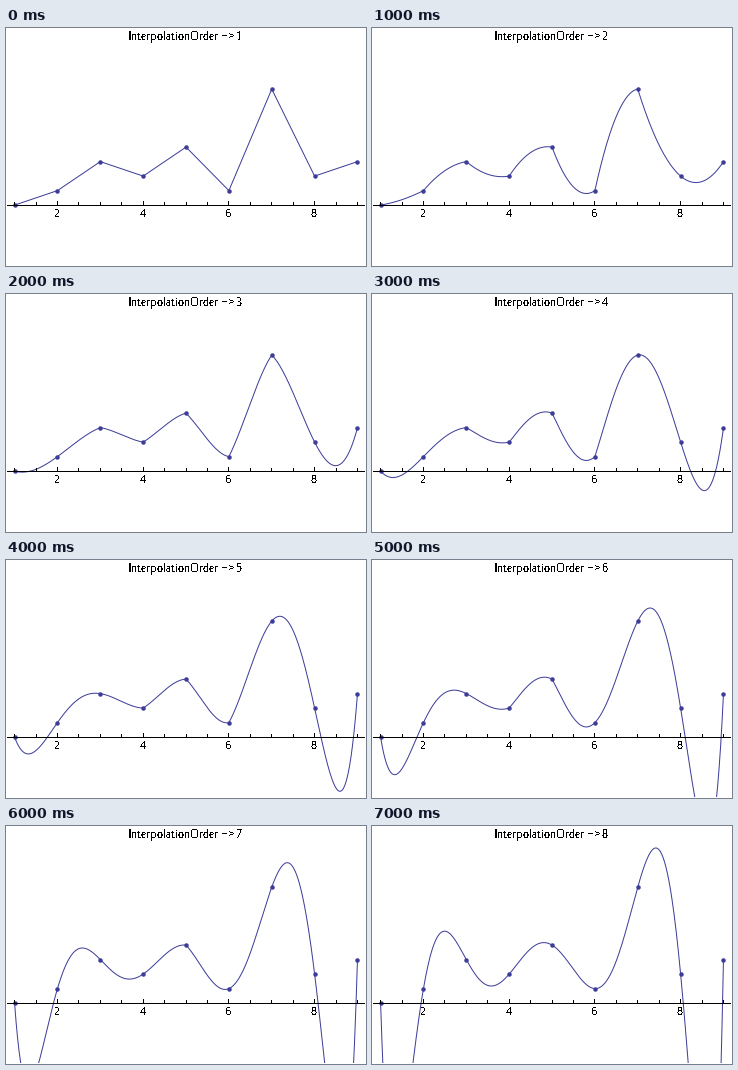
A matplotlib script for the animation above (8 s loop, 360 by 238 pixels).

```python
import numpy as np
import matplotlib.pyplot as plt
from matplotlib.animation import FuncAnimation
from matplotlib.patches import Rectangle

W, H, DPI = 360, 238, 100
PX = 72 / DPI                      # points per pixel
VALUES = np.array([0, 1, 3, 2, 4, 1, 8, 2, 3], float)
N = len(VALUES)
BLUE = (0.24, 0.24, 0.6)


def px(x):
    return 8.6 + 42.86 * (x - 1)


def py(y):
    return 177.1 - 14.5 * y


def lagrange(nodes, vals, x):
    total = np.zeros_like(x)
    for i, xi in enumerate(nodes):
        term = np.full_like(x, vals[i])
        for j, xj in enumerate(nodes):
            if j != i:
                term *= (x - xj) / (xi - xj)
        total += term
    return total


def curve(order):
    """Piecewise interpolation: each interval uses its order+1 nearby nodes."""
    xs, ys = [], []
    for k in range(N - 1):
        start = min(max(k - (order - 1) // 2, 0), N - 1 - order)
        idx = np.arange(start, start + order + 1)
        x = np.linspace(k, k + 1, 60)
        xs.append(x + 1)
        ys.append(lagrange(idx, VALUES[idx], x))
    return px(np.concatenate(xs)), py(np.concatenate(ys))


plt.rcParams.update({
    "font.family": "Liberation Serif",
    "text.hinting": "native",
    "text.hinting_factor": 1,
    "text.antialiased": False,
})
fig = plt.figure(figsize=(W / DPI, H / DPI), dpi=DPI, facecolor="white")
ax = fig.add_axes([0, 0, 1, 1])
ax.set_xlim(0, W)
ax.set_ylim(H, 0)
ax.axis("off")


def label(x, y, text, size):
    return ax.text(x, y, text, fontsize=size * PX, ha="left",
                   va="baseline", color="black", zorder=4)


def bar(x, y, w, h):
    ax.add_patch(Rectangle((x, y), w, h, fc="black", lw=0,
                           antialiased=False, zorder=3))


line, = ax.plot([], [], color=BLUE, lw=PX, solid_joinstyle="round",
                snap=False, zorder=2)
line.set_clip_path(Rectangle((0, 0), W, H - 1, transform=ax.transData))
nodes = np.arange(1, N + 1)
ax.plot(px(nodes), py(VALUES), "o", color=BLUE, ms=4.5 * PX, mew=0,
        snap=False, zorder=2.5)

bar(1, 177, 358, 1)
for t in np.arange(1, N + 0.1, 0.5):
    major = t % 2 == 0
    size = 5 if major else 4
    x = int(px(t))
    bar(x, 178 - size, 1, size)
    if major:
        label(x - 3, 189, str(int(t)), 11)

label(122, 12, "InterpolationOrder", 12)
label(215, 12, "\u2212>", 12)
number = label(230, 12, "1", 12)


def update(frame):
    order = frame + 1
    line.set_data(*curve(order))
    number.set_text(str(order))
    return line, number


anim = FuncAnimation(fig, update, frames=8, interval=1000, repeat=True,
                     repeat_delay=0, blit=False)
plt.show()
```
